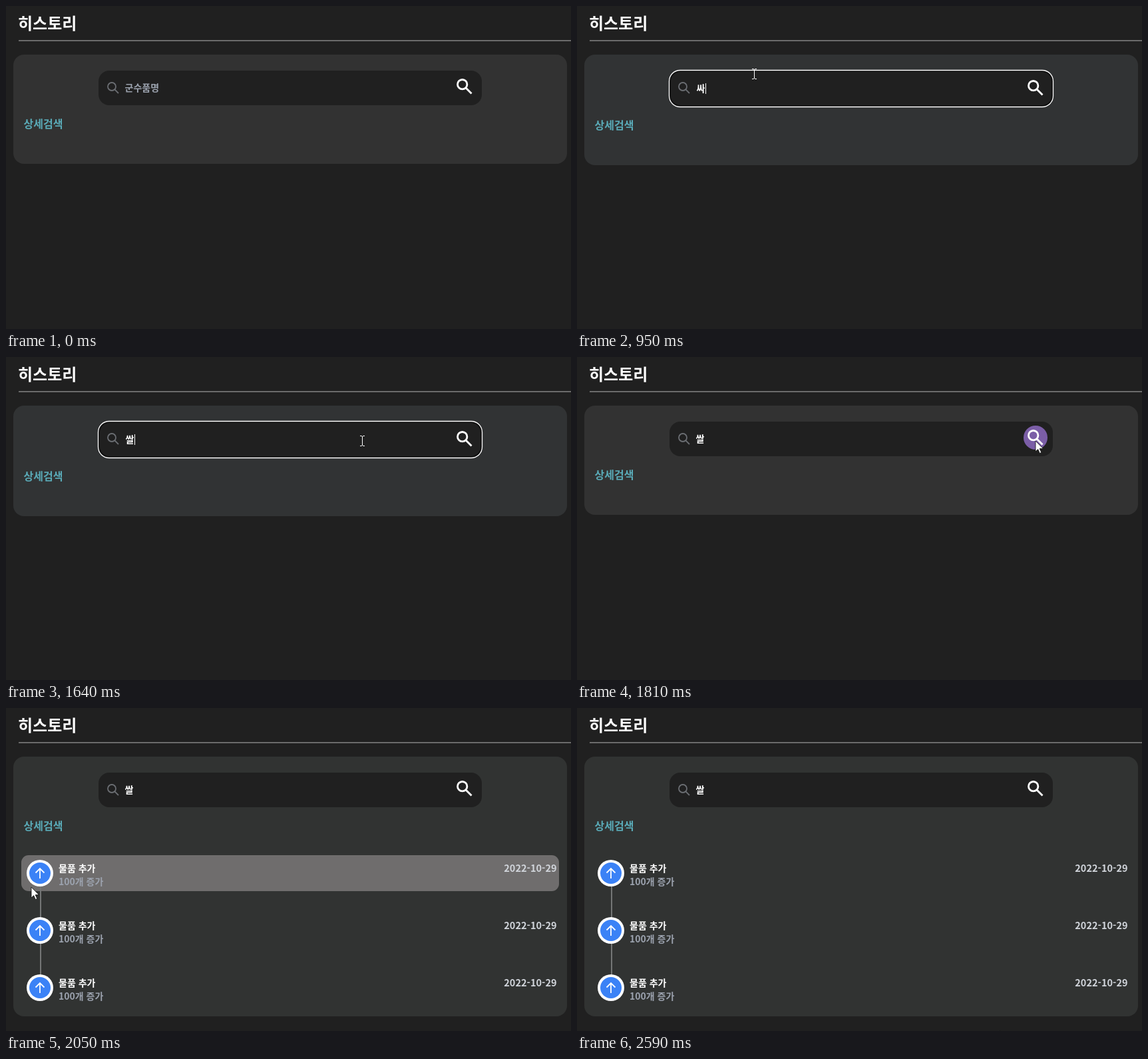
Animation of 849x485 px, one loop 3.01 s. Source, as an HTML page:

```html
<!DOCTYPE html>
<html lang="ko">
<head>
<meta charset="utf-8">
<style>
  html, body { margin: 0; width: 100%; height: 100%; overflow: hidden; background: #202020; }
  svg { display: block; }
  text { font: 700 14px "Noto Sans CJK KR", "Noto Sans CJK", "Noto Sans KR", sans-serif; fill: #fff; }
  .title { font-size: 24px; }
  .link { font-size: 16px; fill: #5aabb8; }
  .sub { fill: #9ca3af; }
  .date { font-size: 14.5px; fill: #d1d5db; text-anchor: end; }
  .line { fill: none; stroke: #fff; }
</style>
</head>
<body>
<svg width="849" height="485" viewBox="0 0 849 485">
  <text class="title" x="18" y="35">히스토리</text>
  <rect x="19" y="51" width="830" height="2" fill="#6b6b6b"/>
  <rect id="panel" x="11" y="73" width="832" rx="16"/>

  <rect id="field" x="139" y="97" width="576" height="52" rx="16" fill="#202020"/>
  <g id="ring" class="line">
    <rect x="139.75" y="97.75" width="574.5" height="52.5" rx="15.5" stroke="#101010" stroke-width="2.5"/>
    <rect x="138.5" y="96.5" width="577" height="55" rx="16.5" stroke-width="1.3"/>
  </g>
  <g class="line" style="stroke:#6b6e73" stroke-width="1.8">
    <circle cx="159" cy="121" r="6"/><path d="M163.4 125.4L169 131"/>
  </g>
  <text id="query" y="127"></text>
  <rect id="caret" y="116" width="1" height="16" fill="#fff"/>

  <g id="button">
    <circle id="glow" cx="689" cy="121" r="18" fill="#7b5ea7"/>
    <g class="line" stroke-width="2.8">
      <circle cx="685.7" cy="117.7" r="7.2"/><path d="M691 123L699.5 131.5"/>
    </g>
  </g>
  <text id="link" class="link" x="26.5">상세검색</text>
  <g id="results"></g>

  <path id="arrow" fill="#fff" stroke="#111" stroke-width=".8" d="M0 0V16L3.7 12.6L6.3 18.5L8.8 17.4L6.2 11.6H11.5Z"/>
  <path id="beam" class="line" d="M-3 -7.5H-1L.5 -6.5L2 -7.5H4M.5 -6.5V6.5M-3 7.5H-1L.5 6.5L2 7.5H4"/>
</svg>
<script>
const LOOP = 3010;
const $ = id => document.getElementById(id);
const set = (id, attrs) => { for (const k in attrs) $(id).setAttribute(k, attrs[k]); };
const show = (id, on) => $(id).style.display = on ? "" : "none";

const rowY = [221, 307, 393];
$("results").innerHTML = rowY.map((y, i) => `
  <g transform="translate(0 ${y})">
    <rect id="row${i}" x="23" width="808" height="54" rx="11" fill="#6f6d6d"/>
    ${i < 2 ? '<rect x="51" y="46" width="2" height="50" fill="#747676"/>' : ""}
    <circle cx="51" cy="27" r="20" fill="#fff"/>
    <circle cx="51" cy="27" r="16" fill="#3b82f6"/>
    <path class="line" stroke-width="1.8" d="M51 35V20M44.5 26.5L51 20L57.5 26.5"/>
    <text x="79" y="24.5">물품 추가</text>
    <text class="sub" x="79" y="44.5">100개 증가</text>
    <text class="date" x="827.5" y="24.5">2022-10-29</text>
  </g>`).join("");

// The pointer moves in discrete steps; bend eases the vertical part.
const moves = [
  { start: 30, end: 370, steps: 11, from: [420, 510], to: [266, 102], bend: 1 },
  { start: 1430, end: 1780, steps: 11, from: [266, 102], to: [689, 126], bend: 4 },
  { start: 1910, end: 2050, steps: 3, from: [689, 126], to: [38, 269], bend: 1 },
  { start: 2190, end: 2590, steps: 7, from: [38, 269], to: [636, 484], bend: 1 },
];

function pointer(t) {
  const m = moves.filter(m => t >= m.start).pop();
  if (!m) return [-50, -50];
  const step = Math.floor((t - m.start) / (m.end - m.start) * (m.steps - 1) + 1e-6);
  const p = Math.min(1, (step + 1) / m.steps);
  const q = 1 - (1 - p) ** m.bend;
  return [m.from[0] + (m.to[0] - m.from[0]) * p, m.from[1] + (m.to[1] - m.from[1]) * q];
}

function render(t) {
  const focused = t >= 370 && t < 1810;
  const found = t >= 1840;
  const typed = t < 880 ? "" : t < 930 ? "ㅆ" : t < 980 ? "싸" : "쌀";
  const blinkFrom = t < 880 ? 370 : 980;
  const caretOn = focused && (t < blinkFrom || Math.floor((t - blinkFrom) / (t < 880 ? 270 : 240)) % 2 === 0);
  const [x, y] = pointer(t);
  const overButton = Math.hypot(x - 689, y - 121) < 18;
  const overField = !overButton && x > 139 && x < 715 && y > 96 && y < 152;

  set("panel", { height: found ? 390 : focused ? 166 : 164, fill: found ? "#313332" : typed && focused ? "#313334" : "#323232" });
  set("field", { height: focused ? 54 : 52 });
  show("ring", focused);
  $("query").textContent = typed || "군수품명";
  set("query", { x: focused ? 179.5 : 178.5, y: focused ? 128.5 : 127.5 });
  $("query").style.fill = typed ? "#fff" : "#9ca3af";
  show("caret", caretOn);
  set("caret", { x: typed ? 193 : 180 });
  set("button", { transform: `translate(0 ${focused ? 2 : 0})` });
  show("glow", overButton);
  set("link", { y: focused ? 185 : 183 });

  show("results", found);
  rowY.forEach((top, i) => show("row" + i, x > 23 && x < 831 && y >= top && y < top + 54));

  show("arrow", !overField);
  show("beam", overField);
  set(overField ? "beam" : "arrow", { transform: `translate(${Math.round(x)} ${Math.round(y)})` });
}

const began = performance.now();
function frame() {
  render((performance.now() - began) % LOOP);
  requestAnimationFrame(frame);
}
frame();
</script>
</body>
</html>
```
